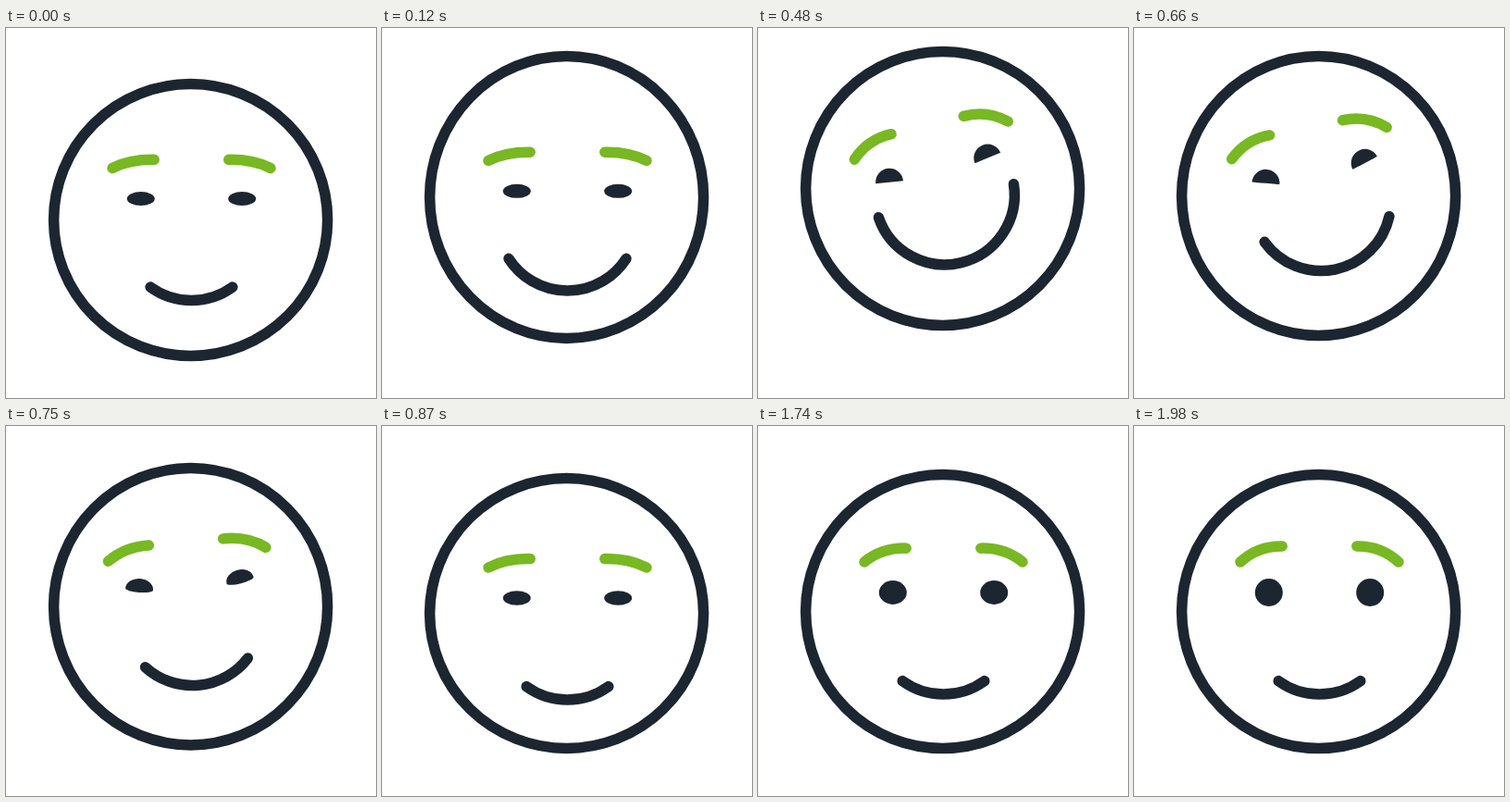
Recreate the animation shown at these times as an HTML page. Size 400 by 400 pixels, loop 5030 ms.

```html
<!DOCTYPE html>
<html lang="en">
<head>
<meta charset="utf-8">
<title>Smiling face</title>
<style>
  html, body { margin: 0; width: 100%; height: 100%; overflow: hidden; background: #fff; }
  svg { display: block; width: 100%; height: 100%; }
  .line { fill: none; stroke: #1c2630; stroke-width: 11.5; stroke-linecap: round; }
  .brow { stroke: #78b822; }
  .eye { fill: #1c2630; }
</style>
</head>
<body>
<svg viewBox="0 0 400 400">
  <ellipse id="head" class="line" cx="199.6" rx="148"/>
  <g id="face">
    <g><path class="line brow"/><path class="eye"/></g>
    <g transform="scale(-1 1)"><path class="line brow"/><path class="eye"/></g>
    <path id="mouth" class="line"/>
  </g>
</svg>
<script>
const LOOP = 5030, STEP = 30;
const PIVOT = 22;        // eye line to the face's turning point
const MOUTH_R = 75.5;
const EYE_R = 15;

// Progress from a to b, shaped in different ways
const part = (t, a, b) => Math.max(0, Math.min(1, (t - a) / (b - a)));
const ease = (t, a, b) => { const u = part(t, a, b); return u * u * (3 - 2 * u); };
const rise = (t, a, b) => Math.sin(part(t, a, b) * Math.PI / 2);
const fall = (t, a, b) => part(t, a, b) ** 2;
const bump = (t, a, b) => Math.sin(part(t, a, b) * Math.PI);
const pulse = (t, a, b, c, d) => ease(t, a, b) - ease(t, c, d);

const head = document.getElementById('head');
const face = document.getElementById('face');
const mouth = document.getElementById('mouth');
const brows = document.querySelectorAll('.brow');
const eyes = document.querySelectorAll('.eye');

function drawHead(t) {
  // Jump, drop, then rebound to rest
  const y = 207.5 - 34 * rise(t, 0, 234) + 34.5 * fall(t, 520, 810) - 7.5 * rise(t, 810, 925);
  const stretch = ease(t, 0, 120) - 1 + 4.5 * bump(t, 0, 240)
    + 3 * bump(t, 510, 810) - 2 * bump(t, 780, 960);
  head.setAttribute('cy', y);
  head.setAttribute('ry', 148 + stretch);
}

function placeFace(t) {
  const y = 206.5 - 31.5 * ease(t, 0, 360) + 33 * ease(t, 608, 870) - 6 * ease(t, 870, 1080);
  const turn = -13.9 * pulse(t, 120, 390, 590, 860);
  face.setAttribute('transform', `translate(200.5 ${y}) rotate(${turn}) translate(0 ${-PIVOT})`);
}

function drawEyes(t) {
  const half = EYE_R / 2;
  const laugh = pulse(t, 120, 330, 650, 860);
  const wide = ease(t, 840, 1080);
  const open = 1 - 0.9 * pulse(t, 1710, 1830, 1860, 1980);
  const top = half * (1 + laugh + wide) * open;
  const bottom = half * (1 - laugh + wide) * open;
  const tilt = 8.5 * laugh + 8 * bump(t, 510, 810);
  const inner = -34.2 - 1.06 * top;   // brows follow the upper lids

  brows.forEach(b => b.setAttribute('d', `M-85.5-33Q-66.5 ${inner - 0.5} -40.3 ${inner}`));
  eyes.forEach(e => {
    e.setAttribute('d', `M${-EYE_R} 0A${EYE_R} ${top} 0 0 1 ${EYE_R} 0A${EYE_R} ${bottom} 0 0 1 ${-EYE_R} 0Z`);
    e.setAttribute('transform', `translate(-54.7 0) rotate(${tilt})`);
  });
}

function drawMouth(t) {
  const smile = rise(t, 0, 420) - ease(t, 510, 860);
  const angle = (36 + 49 * smile) * Math.PI / 180;
  const x = MOUTH_R * Math.sin(angle);
  const y = 34.5 - 7 * smile ** 1.3 + MOUTH_R * Math.cos(angle);
  mouth.setAttribute('d', `M${-x} ${y}A${MOUTH_R} ${MOUTH_R} 0 0 0 ${x} ${y}`);
}

function frame() {
  const t = Math.floor(((performance.now() - start) % LOOP) / STEP) * STEP;
  drawHead(t);
  placeFace(t);
  drawEyes(t);
  drawMouth(t);
  requestAnimationFrame(frame);
}

const start = performance.now();
frame();
</script>
</body>
</html>
```
